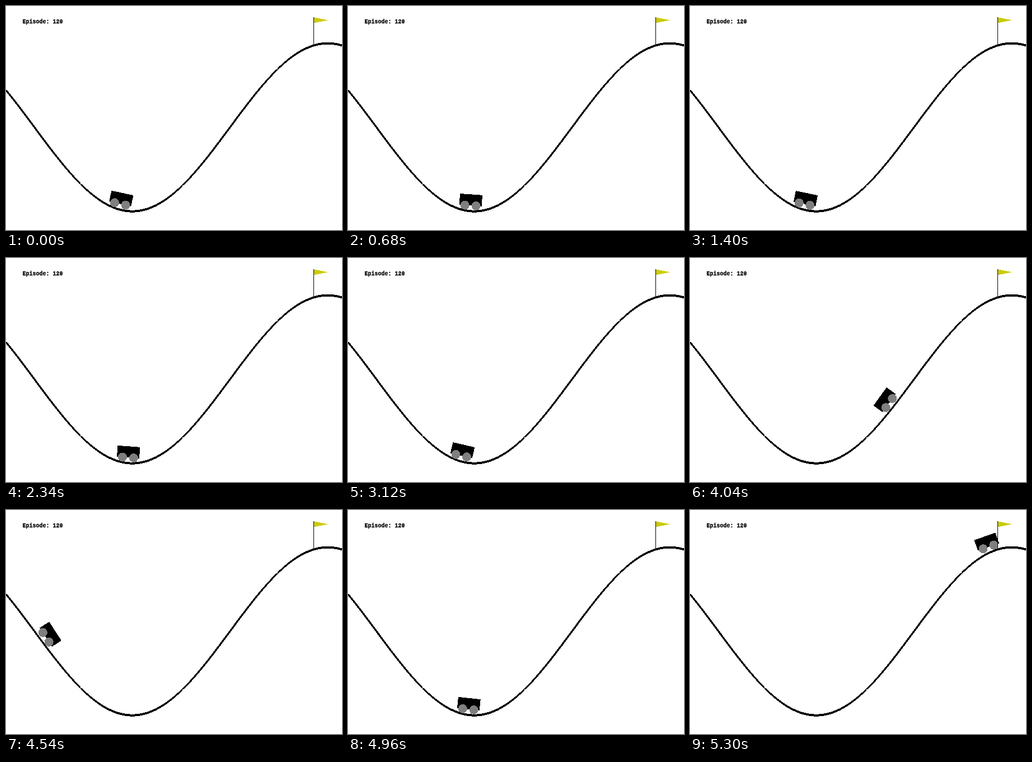
Recreate the animation shown at these times as an HTML page. Size 600 px wide and 400 px high, loop 5320 ms.

```html
<!DOCTYPE html>
<html lang="en">
<head>
<meta charset="utf-8">
<title>Mountain car</title>
<style>
  html, body { margin: 0; width: 100%; height: 100%; overflow: hidden; background: #fff; }
  svg { display: block; width: 600px; height: 400px; }
  text {
    font: bold 10px "Liberation Mono", "DejaVu Sans Mono", monospace;
    stroke: #000;
    stroke-width: 0.3px;
  }
</style>
</head>
<body>
<svg viewBox="0 0 600 400" shape-rendering="crispEdges">
  <path id="track"/>
  <g id="car">
    <rect x="-20" y="-30" width="40" height="20"/>
    <circle cx="10" cy="-10" r="8" fill="#7f7f7f"/>
    <circle cx="-10" cy="-10" r="8" fill="#7f7f7f"/>
  </g>
  <rect x="549" y="20" width="1" height="50"/>
  <path d="M550 20.3V30.3L575 25.3Z" fill="#cccc00"/>
  <text x="29.5" y="31">Episode: 120</text>
</svg>
<script>
const STEP_MS = 20, STEPS = 266;
const SCALE = 600 / 1.8, MIN_POS = -1.2;
const ENGINE = 0.0015, GRAVITY = 0.0025;

const toX = pos => (pos - MIN_POS) * SCALE;
const toY = pos => 400 - (Math.sin(3 * pos) * 0.45 + 0.55) * SCALE;

const state = (step, pos, vel = 0) => ({ step, pos, vel });

// Small swings in the valley, then two large ones up either slope
const swings = [
  state(0, -0.5952), state(15, -0.6115), state(41, -0.5317),
  state(69, -0.5926), state(117, -0.5482), state(143, -0.635),
  state(156, -0.5998, 0.01), state(162, -0.518, 0.0183),
  state(176, -0.189, 0.0238), state(191, 0.0461, 0.0012),
  state(202, -0.109, -0.0288), state(216, -0.641, -0.039),
  state(227, -1.0115, -0.0214)
];
const launch = swings[swings.length - 1];

// Cubic Hermite curve between two states
function glide(a, b, step) {
  const h = b.step - a.step, s = (step - a.step) / h, r = 1 - s;
  return r * r * (1 + 2 * s) * a.pos + s * s * (3 - 2 * s) * b.pos
    + h * s * r * (r * a.vel - s * b.vel);
}

// Full throttle to the right, up to the flag
function drive({ step, pos, vel }, end) {
  for (; step < end; step++) {
    vel += ENGINE - GRAVITY * Math.cos(3 * pos);
    pos += vel;
  }
  return pos;
}

function positionAt(step) {
  if (step >= launch.step) return drive(launch, step);
  const next = swings.findIndex(s => s.step > step);
  return glide(swings[next - 1], swings[next], step);
}

// Line width is measured along the minor axis of each segment
function trackPath() {
  let d = '';
  for (let i = 0; i < 99; i++) {
    const a = MIN_POS + 1.8 * i / 99, b = MIN_POS + 1.8 * (i + 1) / 99;
    const [x0, y0, x1, y1] = [toX(a), toY(a), toX(b), toY(b)];
    const steep = Math.abs(y1 - y0) > x1 - x0;
    const dx = steep ? 2 : 0, dy = steep ? 0 : 2;
    d += `M${x0 - dx} ${y0 - dy}L${x1 - dx} ${y1 - dy}L${x1 + dx} ${y1 + dy}L${x0 + dx} ${y0 + dy}Z`;
  }
  return d;
}

const car = document.getElementById('car');
document.getElementById('track').setAttribute('d', trackPath());

function draw(ms) {
  const pos = positionAt(Math.floor(ms / STEP_MS) % STEPS);
  const tilt = -Math.cos(3 * pos) * 180 / Math.PI;
  car.setAttribute('transform', `translate(${toX(pos)} ${toY(pos)}) rotate(${tilt})`);
}

const start = performance.now();
function tick() {
  draw(performance.now() - start);
  requestAnimationFrame(tick);
}
tick();
</script>
</body>
</html>
```
